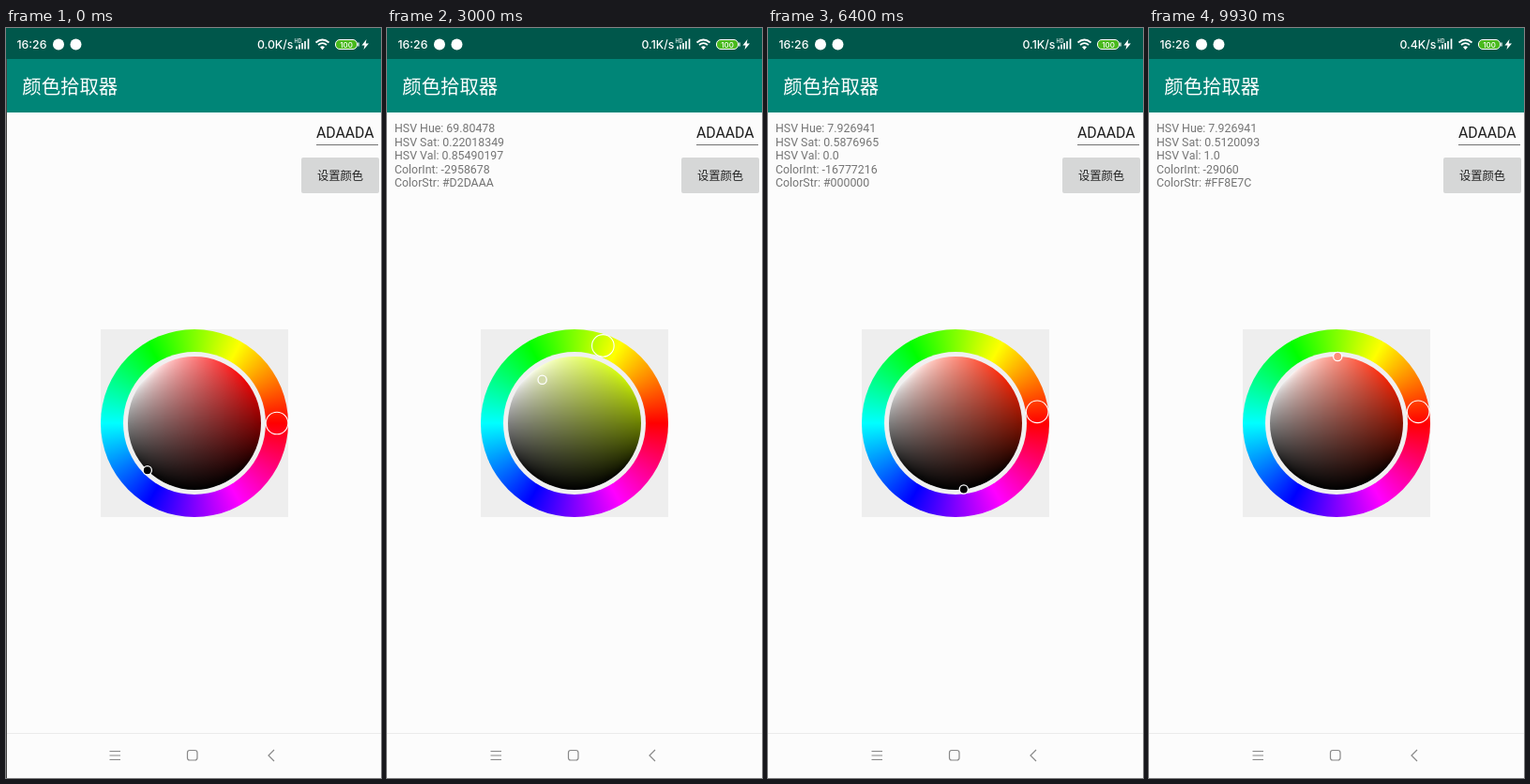
Write an HTML page with a canvas that moves like this. It is 400 by 799 pixels and loops after 9990 ms.

```html
<!DOCTYPE html>
<html lang="zh-CN">
<head>
<meta charset="utf-8">
<style>
  html, body { margin: 0; width: 100%; height: 100%; overflow: hidden; background: #fcfcfc; }
  #wheel, #ring, #disc, svg { position: absolute; }
  #wheel { left: 100px; top: 321px; width: 200px; height: 200px; background: #eee; }
  #ring {
    inset: 0; border-radius: 50%;
    background: conic-gradient(from 90deg, red, #f0f, blue, cyan, lime, yellow, red);
  }
  #ring::after {
    content: ""; position: absolute; inset: 24px;
    border-radius: 50%; background: #f0f0f0;
  }
  #disc { left: 29px; top: 29px; border-radius: 50%; }
  svg { left: 0; top: 0; }
  .cjk { font-family: "Noto Sans CJK SC", "Noto Sans CJK", sans-serif; }
  .ui { font-family: Roboto, sans-serif; }
  .status { font: 500 12.3px Inter, sans-serif; fill: #fff; }
</style>
</head>
<body>
<div id="wheel"><div id="ring"></div><canvas id="disc" width="142" height="142"></canvas></div>
<svg width="400" height="799" viewBox="0 0 400 799">
  <g id="app">
    <rect y="33" width="400" height="57" fill="#008577"/>
    <text class="cjk" x="16.3" y="69.5" font-size="20.4" fill="#fff">颜色拾取器</text>
    <g id="info" class="ui" font-size="12.36" fill="#757575"></g>
    <text class="ui" x="330" y="117" font-size="15.8" fill="#212121">ADAADA</text>
    <path d="M330 124.5h66" stroke="#737373"/>
    <rect x="314" y="138" width="83" height="38" rx="2" fill="#d6d7d7"/>
    <rect id="press" x="314" y="138" width="83" height="38" rx="2" opacity="0"/>
    <text class="cjk" x="355.5" y="161.5" font-size="12.3" text-anchor="middle" fill="#212121">设置颜色</text>
    <g stroke="#fff">
      <circle id="hueDot" r="11.8" fill="none" stroke-width="1.1"/>
      <circle id="svDot" r="4.6" stroke-width="1.3"/>
    </g>
  </g>
  <path d="M0 751.5h400" stroke="#ebebeb"/>
  <rect id="edge" y="33" width="1" height="766" fill="#444"/>
  <rect width="400" height="33" fill="#00574b"/>
  <g class="status">
    <text x="11.5" y="22">16:26</text>
    <circle cx="56" cy="17.5" r="6"/><circle cx="74.5" cy="17.5" r="6"/>
    <text id="speed" x="306.5" y="22" text-anchor="end"></text>
    <text x="307.5" y="15.5" font-size="5.5">HD</text>
    <path d="M310 22.5v-3M313 22.5v-5M316 22.5v-6.5M319 22.5v-8.5M322.5 22.5v-11" stroke="#fff" stroke-width="1.7"/>
    <path d="M330.5 15.5q7-6 14 0M333 18q4.5-3.8 9 0" fill="none" stroke="#fff" stroke-width="1.7"/>
    <path d="M335 20.3q2.5-2 5 0l-2.5 3z"/>
    <rect x="351.5" y="12.5" width="23" height="10" rx="4.5" fill="#48b91c" stroke="#fff"/>
    <path d="M376 15.5v4" stroke="#fff" stroke-width="1.3"/>
    <text x="363" y="20.5" font-size="8" text-anchor="middle">100</text>
    <path d="M384.5 12l-5 6.5h3l-1 4.5 5.5-6.5h-3.3z"/>
  </g>
  <g fill="none" stroke="#888" stroke-width="1.2">
    <path d="M110.5 770.5h11.5m-11.5 4.5h11.5m-11.5 4.5h11.5M286 769l-6 6 6 6"/>
    <rect x="193.5" y="769.5" width="10.5" height="10.5" rx="2.5"/>
  </g>
</svg>
<script>
const $ = id => document.getElementById(id);
const LOOP = 9990, FPS = 15, SIZE = 142;
const ctx = $('disc').getContext('2d');
const image = ctx.createImageData(SIZE, SIZE);
const root = x => Math.sqrt(Math.max(0, x));

// Unit disc <-> saturation/value square
function toSV(x, y) {
  const k = 2 * Math.SQRT2, d = x * x - y * y;
  const axis = (a, e) => {
    const u = (root(2 + e + k * a) - root(2 + e - k * a)) / 2;
    return Math.round((u + 1) * 5e8) / 1e9;
  };
  return [axis(x, d), axis(y, -d)];
}
function toPolar(s, v, turns = 0) {
  const a = 2 * s - 1, b = 2 * v - 1;
  const x = a * root(1 - b * b / 2), y = b * root(1 - a * a / 2);
  return [Math.atan2(y, x) + turns * 2 * Math.PI, Math.hypot(x, y)];
}
function rgb(h, s, v) {
  return [5, 3, 1].map(n => {
    const k = (n + h / 60) % 6;
    return Math.round(255 * v * (1 - s * Math.max(0, Math.min(k, 4 - k, 1))));
  });
}

// Shortest decimal that survives single precision
function float(x) {
  let p = 1;
  while (p < 9 && Math.fround(+x.toPrecision(p)) !== Math.fround(x)) p++;
  const text = String(+x.toPrecision(p));
  return text.includes('.') ? text : text + '.0';
}

// Keys are [step, ...values]
const hueKeys = [[35, 603.75], [45, 429.80478], [60, 162.02571], [79, 7.926941]];
const svKeys = [
  [87, ...toPolar(0.22018349, 0.85490197)],
  [96, ...toPolar(0.5876965, 0, 1)],
  [123, ...toPolar(0.39929068, 0, 2)],
  [149, ...toPolar(0.5120093, 1, 3)]
];
function track(keys, n) {
  const i = keys.findIndex(k => k[0] >= n);
  if (i < 1) return (i ? keys.at(-1) : keys[0]).slice(1);
  const a = keys[i - 1], b = keys[i], p = (n - a[0]) / (b[0] - a[0]);
  return a.slice(1).map((x, j) => x + (b[j + 1] - x) * p);
}

const cells = Array.from({ length: SIZE * SIZE }, (_, i) =>
  toSV((i % SIZE - 70.5) / 71, (70.5 - Math.floor(i / SIZE)) / 71));

function paintDisc(hue) {
  cells.forEach(([s, v], i) => image.data.set([...rgb(hue, s, v), 255], i * 4));
  ctx.putImageData(image, 0, 0);
}
function place(id, angle, r) {
  $(id).setAttribute('cx', 200 + r * Math.cos(angle));
  $(id).setAttribute('cy', 421 - r * Math.sin(angle));
}

let lastStep = -1, lastHue = -1;
function draw(now) {
  const n = Math.floor((now % LOOP) * FPS / 1000 + 0.06);
  requestAnimationFrame(draw);
  if (n === lastStep) return;
  lastStep = n;

  const active = n >= 13;
  const hue = active ? track(hueKeys, n)[0] % 360 : 0;
  const [angle, r] = active ? track(svKeys, n) : toPolar(0, 0);
  const [s, v] = toSV(r * Math.cos(angle), r * Math.sin(angle));
  const color = rgb(hue, s, v);
  const value = color.reduce((sum, c) => sum * 256 + c, 0);

  if (hue !== lastHue) paintDisc(lastHue = hue);
  place('hueDot', hue * Math.PI / 180, 88);
  place('svDot', angle, r * 71);
  $('svDot').setAttribute('fill', `rgb(${color})`);

  const lines = active ? [
    'HSV Hue: ' + float(hue),
    'HSV Sat: ' + float(s),
    'HSV Val: ' + float(v),
    'ColorInt: ' + (value - 0x1000000),
    'ColorStr: #' + value.toString(16).toUpperCase().padStart(6, '0')
  ] : [];
  $('info').innerHTML = lines.map((line, i) =>
    `<text x="8" y="${111 + i * 14.5}">${line}</text>`).join('');

  $('speed').textContent = (n < 36 ? '0.0' : n < 118 ? '0.1' : '0.4') + 'K/s';
  const press = (n - 11) / 7;
  $('press').setAttribute('opacity', press > 0 && press < 1 ? 0.12 * Math.sin(Math.PI * press) : 0);

  const shift = n < 1 ? 1 : n < 2 ? 0.5 : 0;
  $('app').setAttribute('transform', `translate(${shift})`);
  $('wheel').style.transform = `translateX(${shift}px)`;
  $('edge').setAttribute('opacity', shift);
}
requestAnimationFrame(draw);
</script>
</body>
</html>
```
